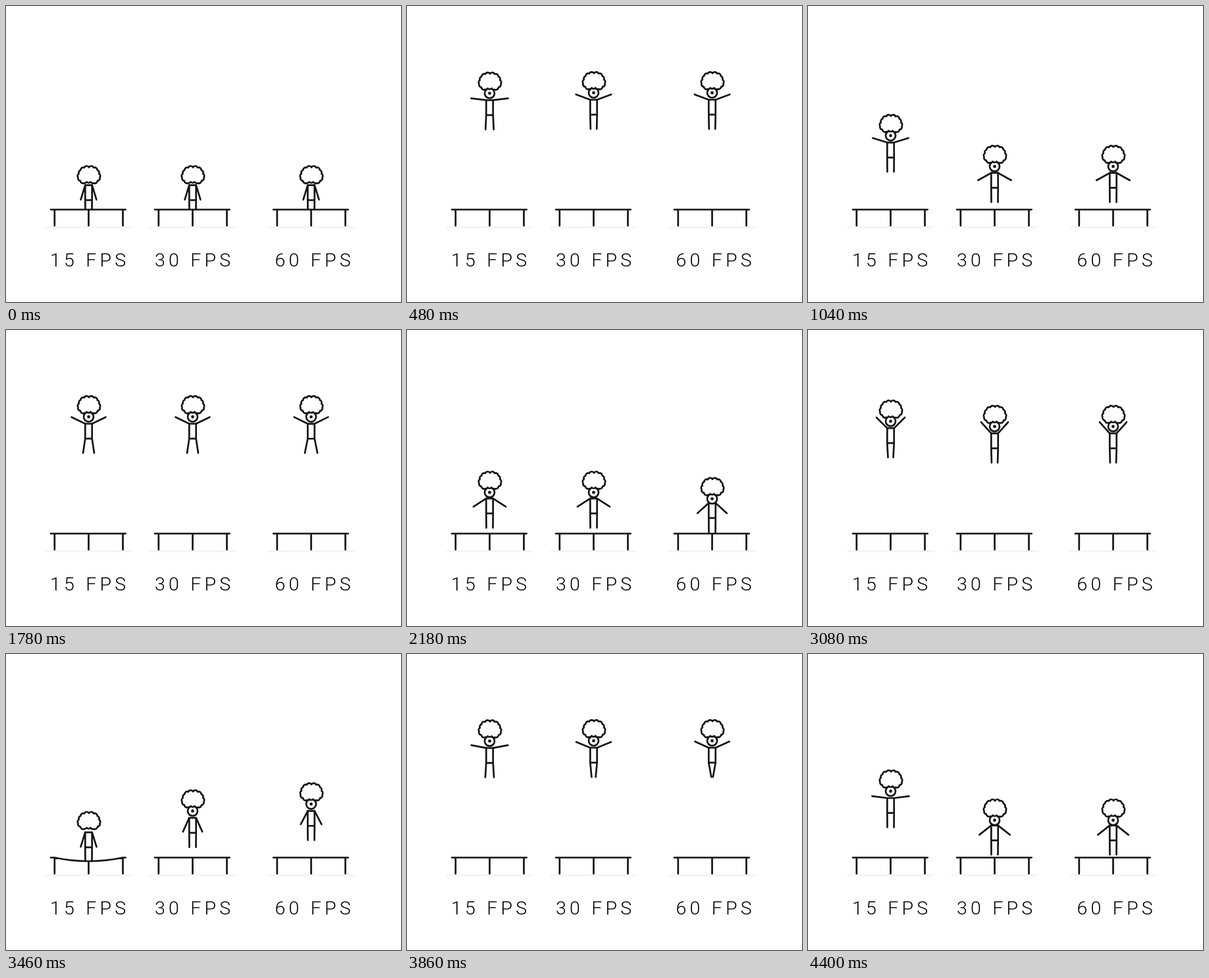
Write an HTML page that moves like this. It is 600 by 450 pixels and loops after 4.42 s.

```html
<!DOCTYPE html>
<html lang="en">
<head>
<meta charset="utf-8">
<title>Frame rates</title>
<style>
  html, body { margin: 0; width: 100%; height: 100%; overflow: hidden; background: #fff; }
  svg { display: block; width: 100vw; height: 100vh; }
  .ink { fill: none; stroke: #151515; stroke-width: 2.7; stroke-linecap: round; stroke-linejoin: round; }
  .ink .solid { fill: #fff; }
  .ink .floor { stroke: #f3f3f3; stroke-width: 2.4; }
  text { font: 300 28.5px Roboto, "Liberation Sans", sans-serif; letter-spacing: 5.2px; fill: #000; }
</style>
</head>
<body>
<svg id="stage" viewBox="0 0 600 450"></svg>
<script>
const LOOP = 4420, STEP = 20;
const JUMP = 55.7, APEX = 28.2;   // in steps
const TOP = 142.5, MAT = 309.5;
const { PI, sin, cos, exp, abs, min, floor } = Math;

const bell = (x, width) => exp(-((x / width) ** 2));

// Pose at phase p of one jump
function pose(p) {
  const fall = 131 * (1 - exp(-((abs(p - APEX) / 21.2) ** 5.5)));
  const swing = -24 - 49 * cos(2 * PI * p / JUMP) + 84 * bell(p - 45, 8.06);
  return {
    y: TOP + fall,
    arm: swing * PI / 180,
    press: 13 * bell(min(p, JUMP - p), 2.2),
    gap: 5 + 6 * cos(2 * PI * (p - 34.3) / 14) * bell(p - 30, 8),
    dip: p < 4.6 ? 9.5 * sin(PI * p / 4.6) : 0
  };
}

function add(parent, tag, attrs = {}) {
  const el = document.createElementNS("http://www.w3.org/2000/svg", tag);
  for (const key in attrs) el.setAttribute(key, attrs[key]);
  parent.appendChild(el);
  return el;
}

// Curls around an uneven oval, closed by a fringe; y counts from the top of the hair
function hairPath() {
  const count = 12, points = [];
  for (let i = 0; i <= count; i++) {
    const a = (118 + 304 * i / count) * PI / 180, r = 1 + 0.04 * sin(5 * a);
    points.push([0.5 + 16.3 * r * cos(a), 15 + 13.2 * r * sin(a)]);
  }
  points.push([3, 24.5], [-3, 24.5], points[0]);
  return points.map((p, i) => (i ? "A4 4 0 0 1 " : "M") + p.map(v => v.toFixed(2)).join(" ")).join("");
}

function makeJumper(x, label, textX, sample) {
  const stage = document.getElementById("stage");
  const g = add(stage, "g", { class: "ink", transform: `translate(${x} 0)` });
  add(g, "path", { class: "floor", d: "M-65 336.5H65" });
  const mat = add(g, "path");
  const body = add(g, "path");
  const face = add(g, "g");
  add(face, "circle", { class: "solid", cy: -10.5, r: 7.5 });
  add(face, "circle", { cy: -10.5, r: 2.4, fill: "#151515", stroke: "none" });
  const hair = add(g, "path", { class: "solid", d: hairPath() });
  const arms = add(g, "path");
  add(stage, "text", { x: textX, y: 396 }).textContent = label;

  return n => {
    const { y, arm, press, gap, dip } = pose(sample(n) % JUMP);
    const hip = y + 22.7, feet = min(y + 44.5, MAT + dip);
    const handX = 5.2 + 23 * cos(arm), handY = y - 23 * sin(arm);

    mat.setAttribute("d", `M-57.5 ${MAT}H-51.7Q0 ${MAT + 2 * dip} 52 ${MAT}H56.2`
      + `M-51.7 ${MAT}V334M0 ${MAT + dip}V334M52 ${MAT}V334`);
    body.setAttribute("d", `M-5.2 ${y}H5.2V${hip}H-5.2Z`
      + `M-5.2 ${hip}L${-gap} ${feet}M5.2 ${hip}L${gap} ${feet}`);
    arms.setAttribute("d", `M-5.2 ${y}L${-handX} ${handY}M5.2 ${y}L${handX} ${handY}`);
    face.setAttribute("transform", `translate(0 ${y + press})`);
    face.setAttribute("visibility", press > 6 ? "hidden" : "visible");
    hair.setAttribute("transform", `translate(0 ${y - 42.5 + press})`);
  };
}

const jumpers = [
  makeJumper(125.5, "15 FPS", 67, n => 4 * floor(n / 4.036)),
  makeJumper(283.5, "30 FPS", 226, n => n - n % 2),
  makeJumper(463.5, "60 FPS", 408.5, n => n)
];

const start = performance.now();
function draw(now) {
  const n = floor(Math.max(0, now - start) % LOOP / STEP);
  jumpers.forEach(update => update(n));
  requestAnimationFrame(draw);
}
draw(start);
</script>
</body>
</html>
```
